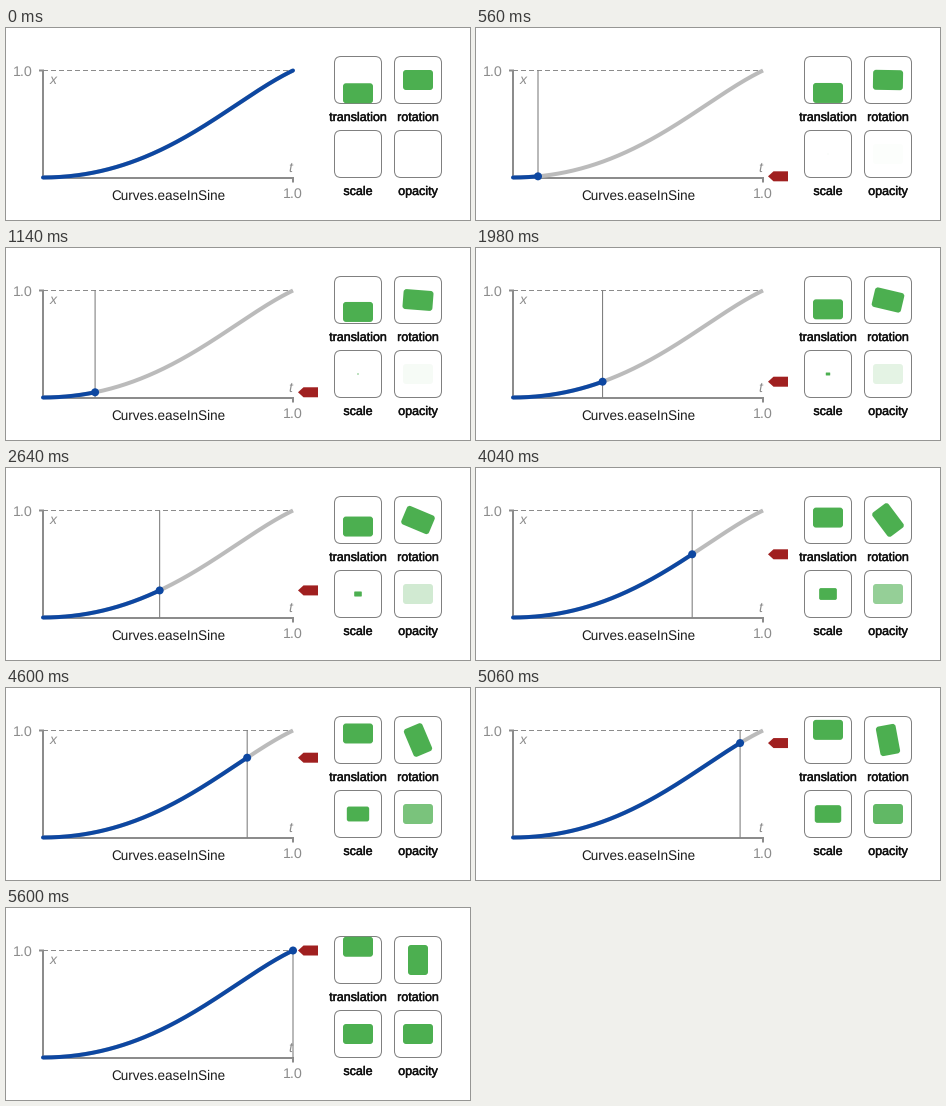
Write a matplotlib script that moves like this. It is 464x192 px and loops after 5620 ms.

```python
import numpy as np
import matplotlib.pyplot as plt
from matplotlib.animation import FuncAnimation
from matplotlib.patches import Circle, FancyBboxPatch, Polygon
from matplotlib.patheffects import Normal, Stroke
from matplotlib.transforms import Affine2D

plt.rcParams["font.family"] = "Liberation Sans"
plt.rcParams["text.hinting"] = "no_hinting"

W, H, DPI = 464, 192, 64
PT = 72 / DPI  # points per pixel
BLUE, GREEN, RED = "#0d47a1", "#4caf50", "#a02020"
AXIS, TRAIL, RULE, INK = "#8c8c8c", "#bbbbbb", "#757575", "#1c1c1c"
X0, X1, Y0, Y1 = 37, 287, 149.5, 42.5
STEPS = 120
HOLD = (0, 1, 1, 1, 1, 1, 2)  # uneven pacing: 20, 100, 20 ms

fig = plt.figure(figsize=(W / DPI, H / DPI), dpi=DPI, facecolor="white")
ax = fig.add_axes([0, 0, 1, 1])
ax.set(xlim=(0, W), ylim=(H, 0))
ax.axis("off")


def ease(u):
    """Points of cubic-bezier(0.47, 0, 0.745, 0.715)."""
    a, b, c = 3 * u * (1 - u) ** 2, 3 * u**2 * (1 - u), u**3
    return 0.47 * a + 0.745 * b + c, 0.715 * b + c


def to_stage(t, v):
    return X0 + (X1 - X0) * t, Y0 + (Y1 - Y0) * v


def stroke(x, y, color, width, **kw):
    kw = {"solid_capstyle": "butt", "snap": False, **kw}
    return ax.plot(x, y, color=color, lw=width * PT, **kw)[0]


def label(x, y, text, size, color=AXIS, ha="center", **kw):
    return ax.text(x, y, text, size=size * PT, color=color, ha=ha,
                   va="baseline", **kw)


def rounded(x, y, w, h, r, **kw):
    box = FancyBboxPatch((x, y), w, h, mutation_aspect=1,
                         boxstyle=f"round,pad=0,rounding_size={r}", **kw)
    return ax.add_patch(box)


def tile(cx, cy, name):
    rounded(cx - 23.5, cy - 23.5, 47, 47, 6.5, fc="none", ec="#808080",
            lw=PT, zorder=2)
    text = label(cx, cy + 41, name, 12.5, "#111111")
    text.set_path_effects([Stroke(linewidth=0.45 * PT, foreground="#111111"),
                           Normal()])
    return rounded(-15, -10, 30, 20, 3, fc=GREEN, ec="none", zorder=3)


def place(box, cx, cy, angle=0, scale=1):
    move = Affine2D().scale(scale).rotate(angle).translate(cx, cy)
    box.set_transform(move + ax.transData)


# Graph
for x in range(X0, X1, 8):
    stroke([x, min(x + 5, X1)], [Y1, Y1], AXIS, 1, zorder=1)
stroke([33, X0, X0, X1, X1], [Y1, Y1, 150, 150, 154.5], AXIS, 2,
       solid_joinstyle="miter", zorder=1)
label(17, 48, "1.0", 14.2)
label(X1, 170, "1.0", 14.2)
label(43.5, 55.5, "x", 14, ha="left", style="italic")
label(284.3, 144, "t", 14, style="italic")
label(162, 172, "Curves.easeInSine", 13.5, INK)

U = np.linspace(0, 1, 1201)
T, V = ease(U)
stroke(*to_stage(T, V), TRAIL, 4, zorder=2)
done = stroke([], [], BLUE, 4, solid_capstyle="round", zorder=4)
rule = stroke([], [], RULE, 1, zorder=3)
dot = ax.add_patch(Circle((X0, Y0), 4, fc=BLUE, ec="none", zorder=5))
ARROW = np.array([(292, 0), (297.5, -5), (312, -5), (312, 5), (297.5, 5)])
arrow = ax.add_patch(Polygon(ARROW, fc=RED, ec="none", zorder=5))

# Samples
slider = tile(352, 52, "translation")
spinner = tile(412, 52, "rotation")
grower = tile(352, 126, "scale")
fader = tile(412, 126, "opacity")


def draw(n):
    cycle, part = divmod(n, len(HOLD))
    step = 3 * cycle + HOLD[part]
    t = step / STEPS
    u = np.interp(t, T, U)
    v = ease(u)[1]
    x, y = to_stage(t, v)

    running = step > 0
    for artist in (rule, dot, arrow):
        artist.set_visible(running)
    us = np.linspace(0, u if running else 1, 160)
    done.set_data(*to_stage(*ease(us)))
    rule.set_data([x, x], [Y1, Y0])
    dot.center = x, y
    arrow.set_xy(ARROW + (0, y))

    place(slider, 352, 52 + 26.5 * (0.5 - v))
    place(spinner, 412, 52, angle=v * np.pi / 2)
    place(grower, 352, 126, scale=max(v, 1e-4))
    grower.set_visible(running)
    place(fader, 412, 126)
    fader.set_alpha(float(np.clip(v, 0, 1)))
    return done, rule, dot, arrow, slider, spinner, grower, fader


anim = FuncAnimation(fig, draw, frames=281, interval=20, repeat=True,
                     repeat_delay=0, blit=False)
plt.show()
```
